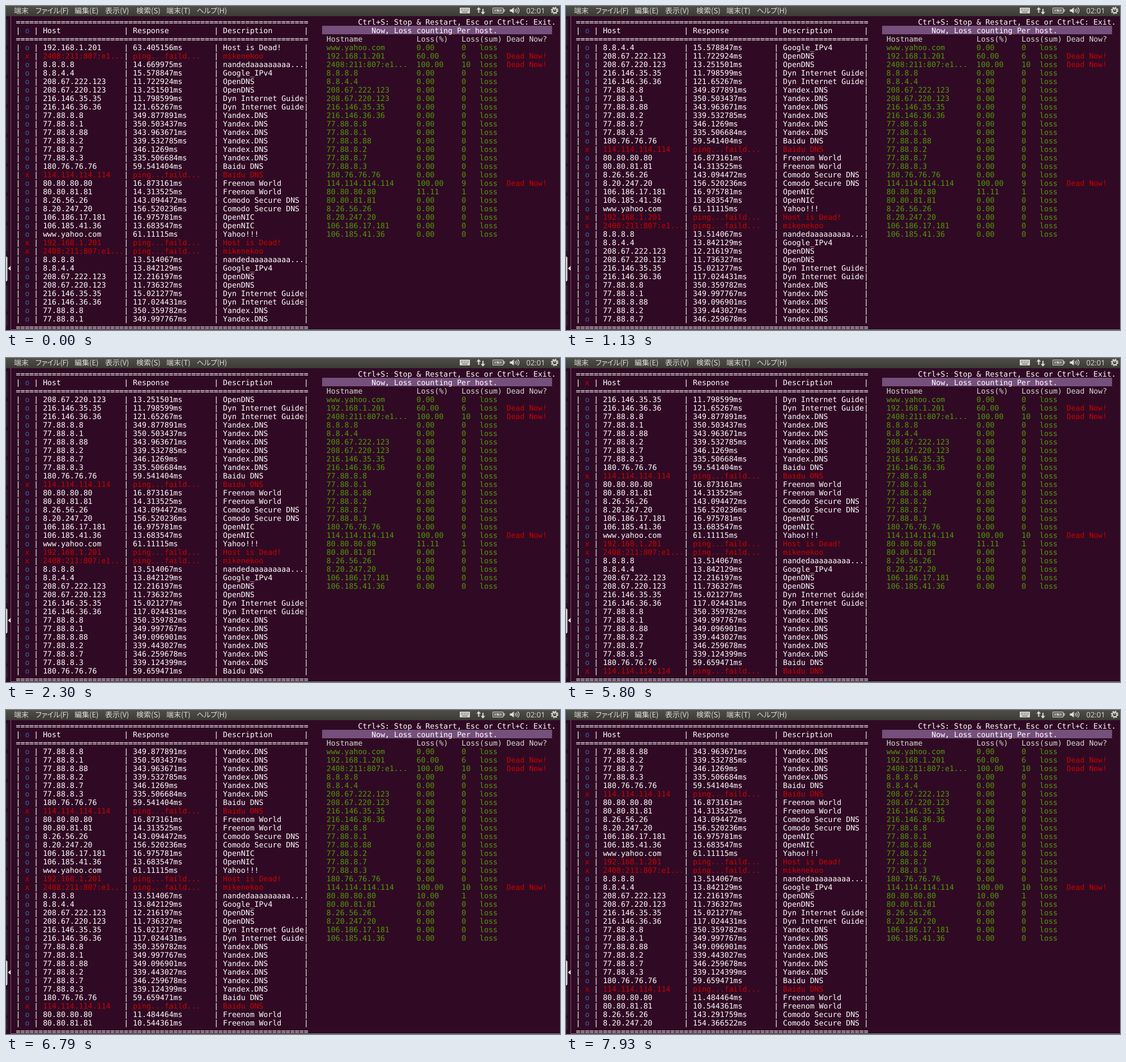
An HTML page for the animation above (8000 ms loop, 978x573 px).

```html
<!DOCTYPE html>
<html lang="ja">
<head>
<meta charset="utf-8">
<title>Ping monitor</title>
<style>
html, body { margin: 0; width: 100%; height: 100%; overflow: hidden; background: #300a24; }
svg { display: block; width: 978px; height: 573px; }
text { white-space: pre; text-rendering: geometricPrecision; }
.term { font: 13.2px "DejaVu Sans Mono", monospace; fill: #fff; }
.menu { font: 13px "Noto Sans CJK JP", "Noto Sans CJK", sans-serif; font-feature-settings: "palt"; fill: #dfdbd2; }
.kana { letter-spacing: -.4px; }
.clock { font: 13px "Open Sans", sans-serif; fill: #dfdbd2; }
</style>
</head>
<body>
<svg id="stage" viewBox="0 0 978 573">
  <defs>
    <linearGradient id="bar" x2="0" y2="1">
      <stop offset="0" stop-color="#504e48"/>
      <stop offset="1" stop-color="#3c3b37"/>
    </linearGradient>
  </defs>
  <rect width="978" height="573" fill="#300a24"/>
  <rect y="18" width="8" height="555" fill="#2c0a21"/>
  <path d="M8.5 18V573" stroke="#7b5570"/>
  <path d="M1.5 24V440M1.5 494V566" stroke="#45303e" stroke-dasharray="46 6"/>
  <path d="M0 443Q2.500 443 2.500 446V484Q2.500 487 0 487Z" fill="#d8d2d4"/>
  <path d="M8 460V468L3.500 464Z" fill="#eee"/>
  <rect width="978" height="18" fill="url(#bar)"/>
  <path d="M9 572.500H978" stroke="#8b7585"/>
  <g id="menu"></g>
  <g fill="#dfdbd2">
    <rect x="801" y="3" width="18" height="10" rx="1"/>
    <path d="M803 5.500H817M803 8H817" stroke="#45433e" stroke-dasharray="1.500 1"/>
    <path d="M805 10.800H815" stroke="#45433e"/>
    <path d="M834.500 2L838.500 6.500H835.500V12H833.500V6.500H830.500ZM842 15L838 10.500H841V5H843V10.500H846Z"/>
    <path d="M859.500 3.500H877.500V12.500H859.500ZM878 6H880V10H878Z" fill="none" stroke="#dfdbd2"/>
    <path d="M861.500 5.500H875.500V10.500H861.500Z" opacity=".6"/>
    <path d="M870 4L865 8.500H868L867 12L872 7.500H869Z" fill="#fff" stroke="#45433e" stroke-width=".6"/>
    <path d="M889.500 6H892.500L896.500 2.500V13.500L892.500 10H889.500Z"/>
    <path d="M898.500 5.500Q900.500 8 898.500 10.500M901 4Q904 8 901 12M903.500 2.500Q908 8 903.500 13.500" fill="none" stroke="#dfdbd2" stroke-width="1.200"/>
    <circle cx="968.500" cy="8" r="4" fill="none" stroke="#dfdbd2" stroke-width="2"/>
    <circle cx="968.500" cy="8" r="5.700" fill="none" stroke="#dfdbd2" stroke-width="2" stroke-dasharray="2.240"/>
    <path d="M968.500 3V8" stroke="#dfdbd2" stroke-width="1.500"/>
  </g>
  <g class="term">
    <rect x="558" y="35" width="406" height="15" fill="#75507b"/>
    <g id="fixed"></g>
    <g id="rows"></g>
    <g id="losses"></g>
  </g>
</svg>
<script>
const LOOP = 8000, ROWS = 33, CELL = 7.947, LINE = 15, LEFT = 17.5, BASE = 32.8;
const STEPS = [130, 560, 1130, 1710, 2300, 5800, 6230, 6790, 7350, 7930];
const RED = '#cc0000', GREEN = '#4e9a06', BLUE = '#3465a4', PALE = '#d3d7cf', WHITE = '#fff';

const HOSTS = `192.168.1.201|Host is Dead!
2408:211:807:e1...|mikenekoo
8.8.8.8|nandedaaaaaaaaa...
8.8.4.4|Google_IPv4
208.67.222.123|OpenDNS
208.67.220.123|OpenDNS
216.146.35.35|Dyn Internet Guide
216.146.36.36|Dyn Internet Guide
77.88.8.8|Yandex.DNS
77.88.8.1|Yandex.DNS
77.88.8.88|Yandex.DNS
77.88.8.2|Yandex.DNS
77.88.8.7|Yandex.DNS
77.88.8.3|Yandex.DNS
180.76.76.76|Baidu DNS
114.114.114.114|Baidu DNS
80.80.80.80|Freenom World
80.80.81.81|Freenom World
8.26.56.26|Comodo Secure DNS
8.20.247.20|Comodo Secure DNS
106.186.17.181|OpenNIC
106.185.41.36|OpenNIC
www.yahoo.com|Yahoo!!!`.split('\n').map(s => s.split('|'));

// Round trips in ping order; "x" is a failed ping
const TIMES = `63.405156 x 14.669975 15.578847 11.722924 13.251501 11.798599 121.65267
349.877891 350.503437 343.963671 339.532785 346.1269 335.506684 59.541404 x 16.873161 14.313525
143.094472 156.520236 16.975781 13.683547 61.11115 x x 13.514067 13.842129 12.216197 11.736327
15.021277 117.024431 350.359782 349.997767 349.096901 339.443027 346.259678 339.124399 59.659471
x 11.484464 10.544361 143.291759 154.366522`.split(/\s+/);

const $ = id => document.getElementById(id);

function addText(parent, x, y, str, attrs = {}) {
  const el = document.createElementNS('http://www.w3.org/2000/svg', 'text');
  el.setAttribute('x', x);
  el.setAttribute('y', y);
  for (const key in attrs) el.setAttribute(key, attrs[key]);
  el.textContent = str;
  parent.append(el);
  return el;
}

const put = (parent, col, row, str, fill = WHITE) =>
  addText(parent, (LEFT + col * CELL).toFixed(2), BASE + row * LINE, str, { fill });

function set(el, str, fill) {
  if (el.textContent !== str) el.textContent = str;
  if (fill) el.setAttribute('fill', fill);
}

const fixed = $('fixed');
const putPipes = row => [0, 4, 24, 44, 64].forEach(col => put(fixed, col, row, '|'));

[[14, '端末'], [52, 'ファイル(F)'], [121, '編集(E)'], [175, '表示(V)'],
 [230, '検索(S)'], [283, '端末(T)'], [336.5, 'ヘルプ(H)']].forEach(([x, label]) =>
  addText($('menu'), x, 12.5, label, { class: /[ァ-ン]/.test(label) ? 'menu kana' : 'menu' }));
addText($('menu'), 918.5, 12.5, '02:01', { class: 'clock' });

for (const row of [0, 2, 36]) put(fixed, 0, row, '='.repeat(65));
putPipes(1);
put(fixed, 6, 1, 'Host');
put(fixed, 26, 1, 'Response');
put(fixed, 46, 1, 'Description');
put(fixed, 76, 0, 'Ctrl+S: Stop & Restart, Esc or Ctrl+C: Exit.');
put(fixed, 79, 1, 'Now, Loss counting Per host.');
[[69, 'Hostname'], [89, 'Loss(%)'], [99, 'Loss(sum)'], [109, 'Dead Now?']]
  .forEach(([col, label]) => put(fixed, col, 2, label, PALE));
const lamp = put(fixed, 2, 1, 'o', BLUE);

const rows = Array.from({ length: ROWS }, (_, i) => {
  putPipes(i + 3);
  return [2, 6, 26, 46].map(col => put($('rows'), col, i + 3, ''));
});

const LOSS = {
  '192.168.1.201': ['60.00', '6', true],
  '2408:211:807:e1...': ['100.00', '10', true],
  '114.114.114.114': ['100.00', '9', true],
  '80.80.80.80': ['11.11', '1', false]
};
const cells = {};
[HOSTS[22], ...HOSTS.slice(0, 22)].forEach(([host], i) => {
  const [rate, sum, dead] = LOSS[host] || ['0.00', '0', false];
  const line = (col, str, fill = GREEN) => put($('losses'), col, i + 3, str, fill);
  line(69, host);
  cells[host] = { rate: line(89, rate), sum: line(99, sum) };
  line(103, 'loss');
  if (dead) line(109, 'Dead Now!', RED);
});

let shown = -1;
function draw(time) {
  const offset = STEPS.filter(t => t <= time).length;
  if (offset === shown) return;
  shown = offset;
  rows.forEach(([mark, host, reply, note], i) => {
    const n = offset + i, [name, about] = HOSTS[n % HOSTS.length];
    const failed = TIMES[n] === 'x', fill = failed ? RED : WHITE;
    set(mark, failed ? 'x' : 'o', failed ? RED : BLUE);
    set(host, name, fill);
    set(reply, failed ? 'ping...faild...' : TIMES[n] + 'ms', fill);
    set(note, about, fill);
  });
  const lost = TIMES[offset + ROWS - 1] === 'x';
  set(lamp, lost ? 'x' : 'o', lost ? RED : BLUE);
  set(cells['114.114.114.114'].sum, offset >= 6 ? '10' : '9');
  set(cells['80.80.80.80'].rate, offset >= 7 ? '10.00' : '11.11');
}

const start = performance.now();
function tick() {
  draw((performance.now() - start) % LOOP);
  requestAnimationFrame(tick);
}
draw(0);
requestAnimationFrame(tick);
</script>
</body>
</html>
```
